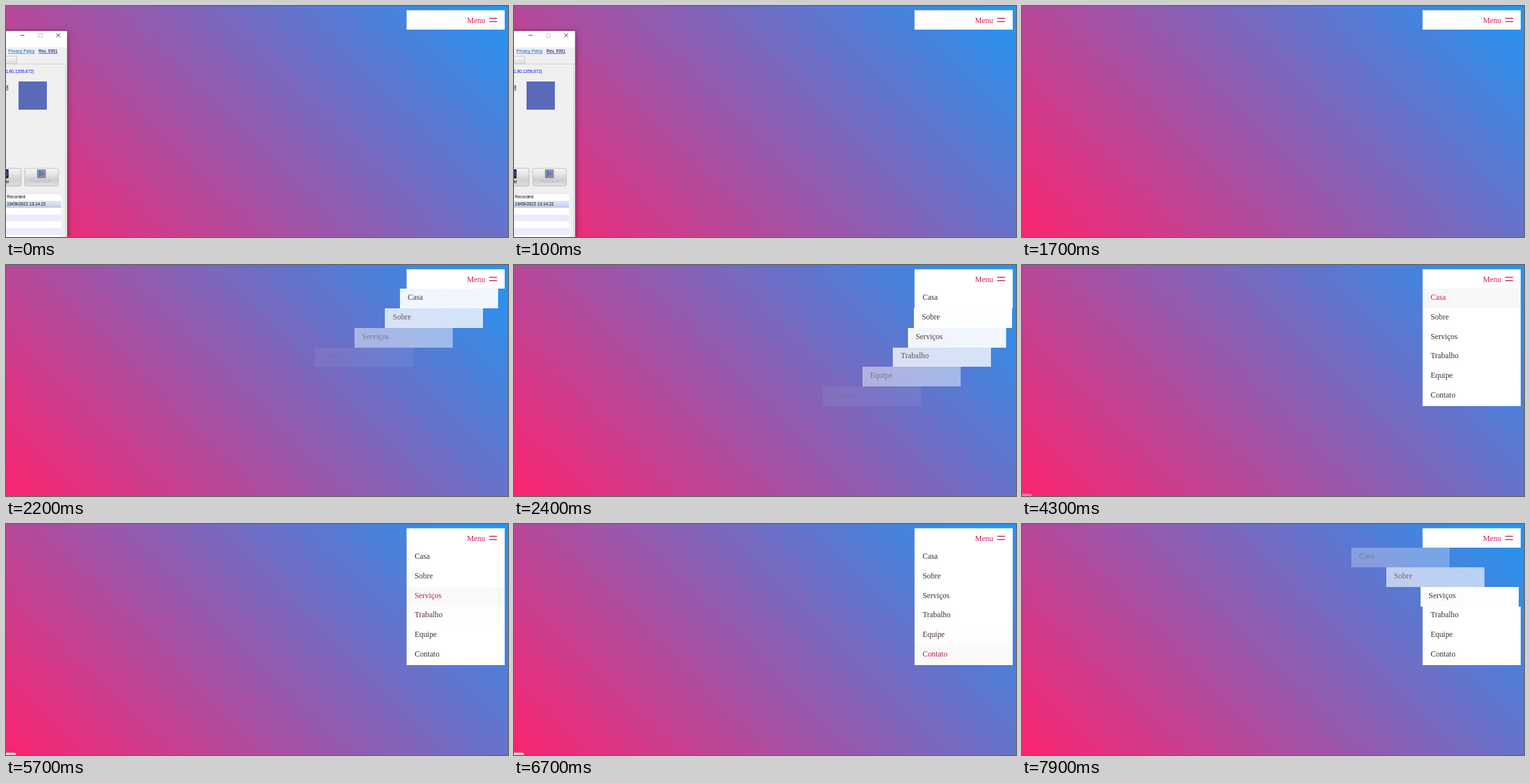
Write an HTML page with a canvas that moves like this. It is 762x352 px and loops after 8 s.

```html
<!DOCTYPE html>
<html lang="pt">
<head>
<meta charset="utf-8">
<title>Menu</title>
<style>
  html, body { margin: 0; width: 100%; height: 100%; overflow: hidden; }
  canvas { display: block; }
</style>
</head>
<body>
<canvas id="stage" width="762" height="352"></canvas>
<script>
const W = 762, H = 352, LOOP = 8000, STEP = 100;
const ctx = document.getElementById('stage').getContext('2d');

const SERIF = '11.9px "Liberation Serif", "Times New Roman", serif';
const SANS = '6.45px "Liberation Sans", Arial, sans-serif';
const PINK = [216, 28, 98], DARK = [51, 51, 51];

const ITEMS = ['Casa', 'Sobre', 'Serviços', 'Trabalho', 'Equipe', 'Contato'];
const MENU = { x: 608.3, y: 6.5, w: 148.8, h: 29.76, pad: 11.9 };
const OPEN_AT = 1862, CLOSE_AT = 7683, SLIDE = 500, STAGGER = 100, FADE = 300;
const WINDOW_GONE = 1700, STATUS_ON = 4300, STATUS_OFF = 7700;

// Pointer visits: item index and arrival time; -1 means no item.
const VISITS = [
  [0, 3850], [1, 4650], [2, 5060], [3, 5650], [4, 6050], [5, 6300],
  [4, 6650], [3, 6750], [2, 6850], [1, 6950], [0, 7250], [-1, 7400]
];

const clamp = v => Math.max(0, Math.min(1, v));

// CSS "ease": cubic-bezier(.25, .1, .25, 1)
function ease(x) {
  x = clamp(x);
  if (x === 0 || x === 1) return x;
  const bez = (a, b, s) => 3 * a * s * (1 - s) ** 2 + 3 * b * s * s * (1 - s) + s ** 3;
  let lo = 0, hi = 1;
  for (let i = 0; i < 24; i++) {
    const mid = (lo + hi) / 2;
    if (bez(0.25, 0.25, mid) < x) lo = mid; else hi = mid;
  }
  return bez(0.1, 1, lo);
}

const mix = (a, b, k) => `rgb(${a.map((v, i) => Math.round(v + (b[i] - v) * k))})`;

function rect(x, y, w, h, fill) {
  ctx.fillStyle = fill;
  ctx.fillRect(x, y, w, h);
}

function text(str, x, y, font, fill) {
  ctx.font = font;
  ctx.fillStyle = fill;
  ctx.fillText(str, x, y);
}

function line(color, width, ...pts) {
  ctx.strokeStyle = color;
  ctx.lineWidth = width;
  ctx.beginPath();
  for (let i = 0; i < pts.length; i += 2) ctx.lineTo(pts[i], pts[i + 1]);
  ctx.stroke();
}

function shade(y0, y1, ...colors) {
  const g = ctx.createLinearGradient(0, y0, 0, y1);
  colors.forEach((c, i) => g.addColorStop(i / (colors.length - 1), c));
  return g;
}

function panel(x, y, w, h, r, fill, border) {
  ctx.beginPath();
  ctx.roundRect(x, y, w, h, r);
  ctx.fillStyle = fill;
  ctx.fill();
  if (border) {
    ctx.strokeStyle = border;
    ctx.lineWidth = 0.8;
    ctx.stroke();
  }
}

function background() {
  // 45 degree gradient through the stage centre
  const d = (W + H) / 4;
  const g = ctx.createLinearGradient(W / 2 - d, H / 2 + d, W / 2 + d, H / 2 - d);
  g.addColorStop(0, '#fc2470');
  g.addColorStop(1, '#2196f3');
  rect(0, 0, W, H, g);
}

function link(str, x, y, color) {
  text(str, x, y, SANS, color);
  rect(x, y + 0.7, ctx.measureText(str).width, 0.6, color);
}

function recorder() {
  ctx.save();
  ctx.shadowColor = 'rgba(0,0,0,.45)';
  ctx.shadowBlur = 9;
  ctx.shadowOffsetY = 2;
  rect(-20, 38, 113, 340, '#f0f0f0');
  ctx.restore();

  rect(0, 38, 93, 25, '#fff');
  line('#555', 0.6, 0, 37.8, 93, 37.8, 93, H);
  line('#222', 0.9, 22, 44.8, 28, 44.8);
  ctx.strokeStyle = '#c4c4c4';
  ctx.strokeRect(49.5, 42, 5.5, 5.5);
  line('#222', 0.9, 76.3, 41.8, 82, 47.5);
  line('#222', 0.9, 82, 41.8, 76.3, 47.5);

  link('Privacy Policy', 3.5, 71.2, '#0066cc');
  link('Rev. 9991', 49.3, 71.2, '#000080');

  panel(-10, 76.5, 26.5, 12, 1.5, shade(76, 88, '#f7f7f7', '#dcdcdc'), '#c2c2c2');
  line('#cfcfcf', 0.8, 0, 88.4, 90.4, 88.4, 90.4, H);
  text('1,80,1356,672)', -0.6, 102.3, SANS, '#1010dd');

  ctx.strokeStyle = '#444';
  ctx.lineWidth = 0.8;
  ctx.strokeRect(-4, 121.4, 6.8, 6.8);
  line('#222', 0.9, -2, 125, 0, 126.8, 2, 122.6);

  rect(19, 115, 43, 43, '#5a6abb');

  const face = shade(247, 274, '#f6f6f6', '#e6e6e6', '#cfcfcf', '#dedede');
  panel(-24, 247.3, 47, 27, 2, face, '#aaa');
  panel(28.3, 247.3, 51.2, 27, 2, face, '#b8b8b8');
  rect(-6, 249, 9.8, 13.5, '#10142e');
  rect(1, 251, 1.4, 9, '#3a62c8');
  text('ar', -1, 270.4, SANS, '#000');

  panel(47, 249, 13.5, 13.5, 1, '#8b909e');
  ctx.fillStyle = '#5c78cc';
  ctx.beginPath();
  ctx.moveTo(49.5, 250.5);
  ctx.lineTo(59, 255.7);
  ctx.lineTo(49.5, 261);
  ctx.fill();
  text('Reproduzir', 38.6, 271, SANS, '#fff');
  text('Reproduzir', 38, 270.4, SANS, '#a3a3a3');

  rect(0, 286, 83.5, 66, '#fff');
  line('#d4d4d4', 0.7, 0, 285.8, 83.5, 285.8);
  rect(0, 296.6, 83.5, 10.4, shade(296, 307, '#e6ecfa', '#c2cdea'));
  line('#9fb0d8', 0.7, 0, 306.8, 83.5, 306.8);
  for (const y of [317.6, 338.6]) rect(0, y, 83.5, 10.4, '#ebebfb');
  text('Recorded', 1.3, 293.3, SANS, '#000');
  text('19/09/2022 13:14:22', 1.3, 303.9, SANS, '#000');
}

function hoverLevel(item, t) {
  let level = 0;
  VISITS.forEach(([who, from], i) => {
    if (who !== item || t < from) return;
    const until = VISITS[i + 1][1];
    const reached = ease((Math.min(t, until) - from) / FADE);
    level = Math.max(level, reached * (1 - ease((t - until) / FADE)));
  });
  return level;
}

function menuItem(i, t) {
  const delay = i * STAGGER;
  const shown = ease((t - OPEN_AT - delay) / SLIDE) - ease((t - CLOSE_AT - delay) / SLIDE);
  if (shown <= 0) return;
  const x = MENU.x - MENU.w * (1 - shown);
  const top = MENU.y + MENU.h * (i + 1);
  const y0 = Math.round(top), y1 = Math.round(top + MENU.h);
  const hover = hoverLevel(i, t);
  ctx.globalAlpha = shown;
  rect(Math.round(x), y0, 149, y1 - y0, mix([255, 255, 255], [247, 247, 247], hover));
  text(ITEMS[i], x + MENU.pad, Math.round(top + 16.8), SERIF, mix(DARK, PINK, hover));
  ctx.globalAlpha = 1;
}

function menuBar() {
  rect(608, 6.5, 149, 29.5, '#fff');
  const pink = mix(PINK, PINK, 0);
  text('Menu', 699.7, 26, SERIF, pink);
  rect(733.4, 18, 12, 1.4, pink);
  rect(733.4, 23, 12, 1.4, pink);
}

function draw(t) {
  background();
  if (t < WINDOW_GONE) recorder();
  ITEMS.forEach((_, i) => menuItem(i, t));
  menuBar();
  if (t >= STATUS_ON && t < STATUS_OFF) {
    ctx.globalAlpha = clamp((t - STATUS_ON + STEP) / (2 * STEP));
    panel(-4, 348.4, 19, 8, 2, '#dcdce0');
    ctx.globalAlpha = 1;
  }
}

const start = performance.now();
function tick() {
  const t = (performance.now() - start) % LOOP;
  draw(Math.floor(t / STEP) * STEP);
  requestAnimationFrame(tick);
}
tick();
</script>
</body>
</html>
```
